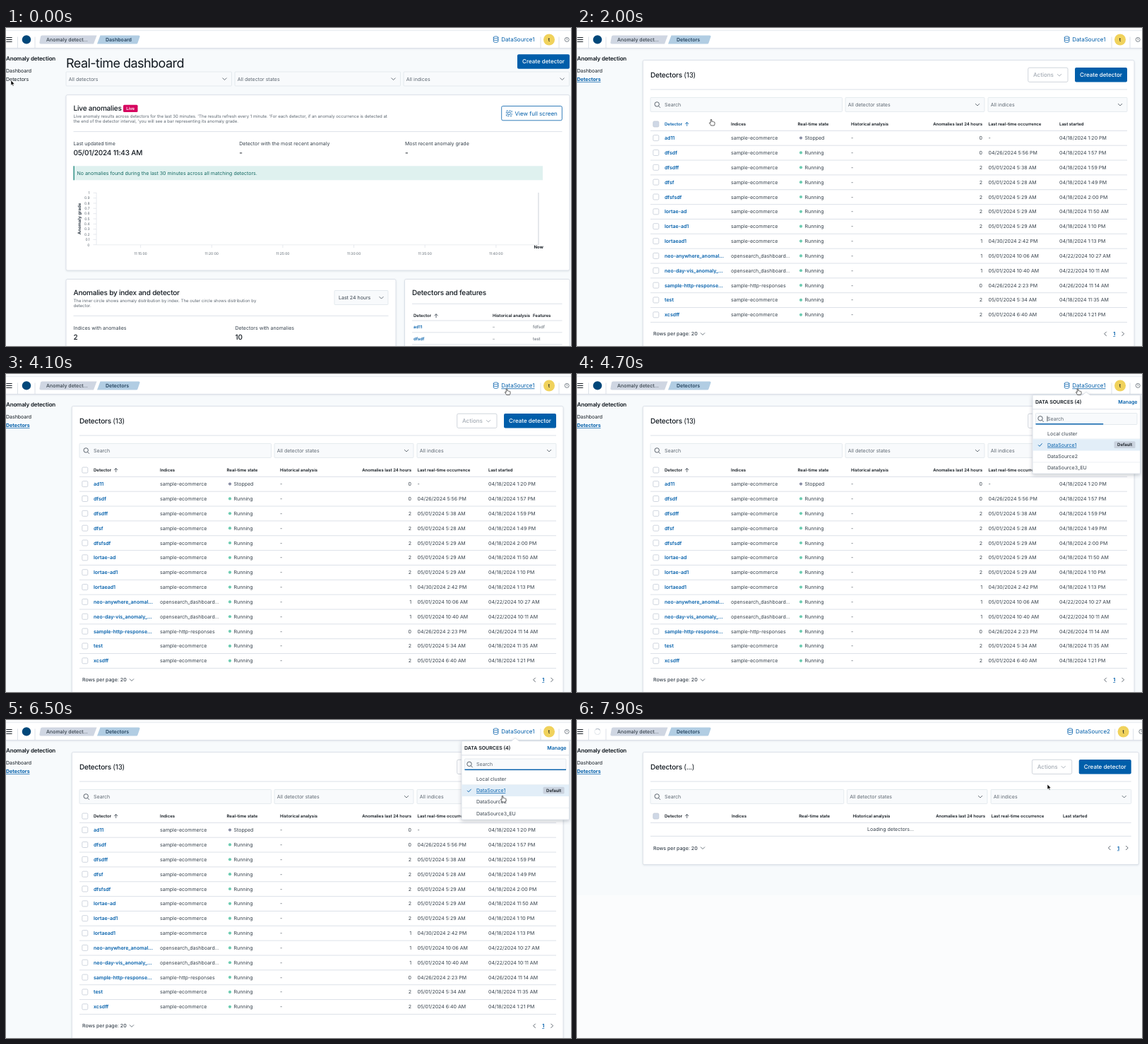
Animation, 800 px wide and 450 px high, one loop 8000 ms. Source, as an HTML page:

```html
<!DOCTYPE html>
<html lang="en">
<head>
<meta charset="utf-8">
<title>Detectors</title>
<style>
  html, body { margin: 0; width: 100%; height: 100%; overflow: hidden; background: #fbfcfd; }
  svg { display: block; width: 800px; height: 450px; }
  text { font-family: Inter, "Noto Sans", sans-serif; text-rendering: geometricPrecision; white-space: pre; }
</style>
</head>
<body>
<svg id="stage" viewBox="0 0 800 450"></svg>
<script>
const LOOP = 8000, STEP = 100;
const INK = '#11181f', BODY = '#36414c', MUTED = '#5c6670', BLUE = '#005eaa', LINE = '#d3dae3';

// y is the middle of the capitals
const text = (x, y, s, { size = 7, w = 400, fill = BODY, ls = 0, at = 'start', extra = '' } = {}) =>
  `<text x="${x}" y="${y + size * 0.36}" font-size="${size}" font-weight="${w}" fill="${fill}" letter-spacing="${ls}em" text-anchor="${at}" ${extra}>${s}</text>`;
const title = (x, y, s) => text(x, y, s, { size: 10, w: 500, fill: INK, ls: -0.02 });
const small = (x, y, s) => text(x, y, s, { size: 6, fill: MUTED });
const head = (x, y, s, at) => text(x, y, s, { size: 6, w: 600, fill: INK, at });
const rect = (x, y, w, h, fill, extra = '') =>
  `<rect x="${x}" y="${y}" width="${w}" height="${h}" fill="${fill}" ${extra}/>`;
const path = (d, stroke, w = 0.8, extra = '') =>
  `<path d="${d}" fill="none" stroke="${stroke}" stroke-width="${w}" ${extra}/>`;
const hline = (x1, x2, y, c = LINE) => path(`M${x1} ${y}H${x2}`, c);
const vline = (x, y1, y2, c = LINE) => path(`M${x} ${y1}V${y2}`, c);
const group = (id, body, extra = '') => `<g id="${id}" ${extra}>${body}</g>`;
const down = (x, y, c = MUTED) => path(`M${x - 3} ${y - 1.4}l3 3l3 -3`, c, 0.9);
const up = (x, y, c) => path(`M${x} ${y + 2.8}V${y - 2.6}M${x - 2.5} ${y}l2.5 -2.6l2.5 2.6`, c);
const lens = (x, y) => path(`M${x + 2} ${y + 2}l2.2 2.4M${x + 2.7} ${y - 0.5}a3.2 3.2 0 1 0 -6.4 0a3.2 3.2 0 1 0 6.4 0`, BODY);
const panel = (x, y, w, h) => rect(x, y, w, h, '#fff', `rx="2" stroke="${LINE}" stroke-width=".8" filter="url(#soft)"`);
const field = (x, y, w, h = 20) => rect(x, y, w, h, '#f8fafc', 'rx="1" stroke="#dce2e9" stroke-width=".7"');
const select = (x, y, w, s) => field(x, y, w) + text(x + 3.8, y + 10, s, { fill: MUTED }) + down(x + w - 10, y + 10);
const primary = (x, y) => rect(x, y, 74, 20.5, BLUE, 'rx="2"') +
  text(x + 37, y + 10.4, 'Create detector', { size: 8, w: 500, fill: '#fff', at: 'middle' });
const box = (x, y, fill = '#fff') => rect(x - 4, y - 4, 8, 8, fill, 'rx="1.5" stroke="#c3cbd6" stroke-width=".8"');

function dashboard() {
  let s = text(0, 72.7, 'Detectors', { fill: INK, extra: 'id="navLink"' }) +
    text(85, 49.5, 'Real-time dashboard', { size: 18, fill: INK, ls: -0.03 }) + primary(724, 37.2) +
    select(85, 62, 234.5, 'All detectors') + select(324, 62, 234.5, 'All detector states') + select(563, 62, 234.5, 'All indices');

  s += panel(85, 94.7, 713, 248.3) + title(95.5, 113.3, 'Live anomalies') +
    rect(166, 108.8, 20.5, 10.2, '#d6065f', 'rx="1.5"') +
    text(176.2, 113.9, 'Live', { size: 6, w: 600, fill: '#fff', at: 'middle' }) +
    small(95.5, 125, "Live anomaly results across detectors for the last 30 minutes. 'The results refresh every 1 minute. 'For each detector, if an anomaly occurrence is detected at") +
    small(95.5, 132, "the end of the detector interval, 'you will see a bar representing its anomaly grade.") +
    rect(701.7, 110.5, 85.6, 20.3, '#fff', `rx="2" stroke="${BLUE}" stroke-width=".8"`) +
    rect(708.5, 117, 7.6, 7.6, 'none', `stroke="${BLUE}" stroke-width=".8" stroke-dasharray="2.4 1.4"`) +
    rect(710.6, 119.1, 3.4, 3.4, 'none', `stroke="${BLUE}" stroke-width=".7"`) +
    text(720.5, 120.7, 'View full screen', { size: 8, fill: BLUE }) + hline(95.5, 787.5, 146.6);
  [[95.5, 'Last updated time', '05/01/2024 11:43 AM'], [330.3, 'Detector with the most recent anomaly', '-'], [565, 'Most recent anomaly grade', '-']]
    .forEach(([x, label, value]) => s += text(x, 163.3, label) + title(x, 176.8, value));
  s += rect(95.5, 195.3, 664.5, 20, '#dff1ef') + rect(95.5, 195.3, 1.3, 20, '#1f857c') +
    text(100.5, 205.3, 'No anomalies found during the last 30 minutes across all matching detectors.', { fill: '#166b64' });

  for (let i = 0; i <= 10; i++) {
    const y = 233.3 + i * 7.34;
    s += text(118.5, y, i % 10 ? `0.${10 - i}` : 1 - i / 10, { size: 5, fill: MUTED, at: 'end' }) + hline(123.5, 128, y, '#e0e4ea');
  }
  s += vline(128, 233, 307, '#e0e4ea') + hline(128, 754, 306.8, '#e6e9ee');
  for (let i = 0; i < 6; i++) {
    const x = 190.6 + i * 100.65;
    s += vline(x, 307, 311, '#e0e4ea') + text(x, 319.6, `11:${15 + 5 * i}:00`, { size: 5, fill: MUTED, at: 'middle' });
  }
  s += text(0, 0, 'Anomaly grade', { size: 6, w: 700, fill: BODY, at: 'middle', extra: 'transform="translate(103.6 270)rotate(-90)"' }) +
    rect(753.2, 233, 1.5, 74, '#dde0e5') + text(754.2, 309.6, 'Now', { size: 6, w: 700, fill: INK, at: 'middle' });

  s += panel(85, 355.5, 467, 120) + title(95.5, 374, 'Anomalies by index and detector') +
    small(95.5, 386, 'The inner circle shows anomaly distribution by index. The outer circle shows distribution by') +
    small(95.5, 393, 'detector.') + field(465, 371.5, 76) + text(471, 381.5, 'Last 24 hours') + down(531.5, 381.5) +
    hline(95.5, 541.5, 407.3) + text(95.5, 424.2, 'Indices with anomalies') + title(95.5, 437.7, '2') +
    text(324.5, 424.2, 'Detectors with anomalies') + title(324.5, 437.7, '10');

  s += panel(564.5, 355.5, 233.5, 120) + title(575, 374, 'Detectors and features') + hline(575, 787.5, 390.3) +
    head(577, 407.3, 'Detector') + up(609, 407.3, BODY) + head(689, 407.3, 'Historical analysis') + head(746, 407.3, 'Features') + hline(575, 787.5, 414);
  [['ad11', 'fdfsdf'], ['dfsdf', 'test']].forEach(([name, feature], i) => {
    const y = 422.5 + i * 17;
    s += text(577, y, name, { size: 6, w: 600, fill: BLUE }) + small(689, y, '–') + small(746, y, feature) + hline(575, 787.5, y + 8.3);
  });
  return s;
}

const E = 'sample-ecommerce', O = 'opensearch_dashboard...';
const ROWS = [
  ['ad11', E, 0, '-', '04/18/2024 1:20 PM'],
  ['dfsdf', E, 0, '04/26/2024 5:56 PM', '04/18/2024 1:57 PM'],
  ['dfsdff', E, 2, '05/01/2024 5:38 AM', '04/18/2024 1:59 PM'],
  ['dfsf', E, 2, '05/01/2024 5:28 AM', '04/18/2024 1:49 PM'],
  ['dfsfsdf', E, 2, '05/01/2024 5:29 AM', '04/18/2024 2:00 PM'],
  ['lortae-ad', E, 2, '05/01/2024 5:29 AM', '04/18/2024 11:50 AM'],
  ['lortae-ad1', E, 2, '05/01/2024 5:29 AM', '04/18/2024 1:10 PM'],
  ['lortaead1', E, 1, '04/30/2024 2:42 PM', '04/18/2024 1:13 PM'],
  ['neo-anywhere_anomal...', O, 1, '05/01/2024 10:06 AM', '04/22/2024 10:27 AM'],
  ['neo-day-vis_anomaly_...', O, 1, '05/01/2024 10:40 AM', '04/22/2024 10:11 AM'],
  ['sample-http-response...', 'sample-http-responses', 0, '04/26/2024 2:23 PM', '04/26/2024 11:14 AM'],
  ['test', E, 2, '05/01/2024 5:34 AM', '04/18/2024 11:35 AM'],
  ['xcsdff', E, 2, '05/01/2024 6:40 AM', '04/18/2024 1:21 PM'],
];

// While loading there is no scrollbar, so the page is a little wider.
function detectors(loading) {
  const dx = loading ? 5.7 : 0, right = 779 + dx;
  const X = x => 104 + (x - 104) * (right - 104) / 675;
  let s = text(0, 72.7, 'Detectors', { w: 700, fill: BLUE, extra: 'text-decoration="underline"' }) +
    panel(93.3, 45.6, 695.7 + dx * 1.1, loading ? 159 : 430) +
    title(104, 66.5, `Detectors <tspan font-weight="400">(${loading ? '...' : 13})</tspan>`) +
    rect(638.7 + dx, 56.2, 56.3, 20.2, '#fff', 'rx="2" stroke="#c4cbd3" stroke-width=".8"') +
    text(646 + dx, 66.5, 'Actions', { size: 8, w: 500, fill: '#a5acb5' }) + down(683 + dx, 66.5, '#a5acb5') +
    primary(705 + dx, 56) + hline(104, right, 87) +
    field(104, 98.4, X(375.5) - 104) + lens(113.7, 108.4) + text(124, 108.6, 'Search', { fill: MUTED }) +
    select(X(380), 98.4, X(577) - X(380), 'All detector states') + select(X(582), 98.4, right - X(582), 'All indices');
  const hot = `id="sort${loading ? 0 : 1}"`;
  s += `<g ${hot}>` + box(111.8, 136, loading ? '#cfd8e6' : '#fff') + head(124, 136, 'Detector') + up(155.7, 136, BODY) + '</g>';
  [[218, 'Indices'], [312.5, 'Real-time state'], [388, 'Historical analysis'], [574, 'Anomalies last 24 hours', 'end'],
   [582.5, 'Last real-time occurrence'], [683, 'Last started']].forEach(([x, label, at]) => s += head(X(x), 136, label, at));
  s += hline(104, right, 145.4);

  if (loading) s += text(444, 154.8, 'Loading detectors...', { at: 'middle' }) + hline(104, right, 164.4);
  else ROWS.forEach(([name, index, count, last, start], i) => {
    const y = 155.6 + i * 20.85;
    s += box(111.8, y) + text(124, y, name, { w: 600, fill: BLUE }) + text(218, y, index) +
      `<circle cx="317" cy="${y}" r="2.1" fill="${i ? '#6dccb1' : '#8a8fa6'}"/>` + text(322.5, y, i ? 'Running' : 'Stopped') +
      text(388, y, '-') + text(574, y, count, { at: 'end' }) + text(582.5, y, last) + text(683, y, start) + hline(104, right, y + 10.6);
  });

  const y = loading ? 181 : 432.8;
  return s + text(108, y, 'Rows per page: 20', { w: 500 }) + down(178, y) +
    path(`M${749.7 + dx} ${y - 3}l-3 3l3 3M${771.5 + dx} ${y - 3}l3 3l-3 3`, BODY) +
    text(760.7 + dx, y, '1', { w: 700, fill: BLUE, at: 'middle', extra: 'text-decoration="underline"' });
}

function header() {
  const right = path('M690.3 13.3v5.6c0 2 6.6 2 6.6 0v-5.6c0 -1.9 -6.6 -1.9 -6.6 0c0 1.9 6.6 1.9 6.6 0M690.3 16.1c0 1.9 6.6 1.9 6.6 0', BLUE) +
    text(701.3, 16.5, 'DataSource1', { size: 8, fill: BLUE, extra: 'id="source"' }) +
    vline(757, 12.5, 28.5) + '<circle cx="769" cy="16.5" r="8" fill="#f0d25c"/>' + text(769, 16.3, 't', { w: 500, fill: INK, at: 'middle' }) +
    vline(783, 12.5, 28.5) + '<circle cx="794.2" cy="16.4" r="3" fill="none" stroke="#5c6670" stroke-width=".8"/>' +
    text(794.2, 16.4, '?', { size: 4.5, at: 'middle' });
  return rect(0, 0, 800, 3.6, '#fbfcfd') + rect(0, 3.6, 800, 25, '#fff', 'filter="url(#soft)"') + hline(0, 800, 3.6, '#e3e7ec') + hline(0, 800, 28.6) +
    path('M.4 13.6H8.6M.4 16.5H8.6M.4 19.4H8.6', INK, 1) + vline(16.5, 12.5, 28.5) + vline(41, 12.5, 28.5) +
    '<circle id="logo" cx="29" cy="16.4" r="6.2" fill="#00477a"/>' +
    group('spin', '<circle r="4" fill="none" stroke="#e2e6eb"/>' + path('M0 -4A4 4 0 0 1 4 0', '#aab4c0', 1)) +
    '<path d="M49.5 10.4H128.5L124 22.5H49.5Q47 22.5 47.5 20L49 12Q49.4 10.4 51 10.4Z" fill="#cfd6e2"/>' +
    '<path d="M133.5 10.4H187.5Q190 10.4 189.4 12.5L186.5 21Q186 22.5 184.5 22.5H129Z" fill="#b1cde3"/>' +
    text(57, 16.5, 'Anomaly detect...', { w: 500 }) + text(141, 16.5, 'Dashboard', { w: 600, fill: '#24435e', extra: 'id="crumb"' }) +
    group('headRight', right) + text(0, 43.3, 'Anomaly detection', { size: 8, w: 600, fill: INK, ls: -0.02 }) + text(0, 60, 'Dashboard', { fill: INK });
}

function menu() {
  const item = (y, s, extra = '', fill = BODY) => text(666, y, s, { fill, extra });
  return `<path d="M645 29.8H715.5L721 25.5L726.5 29.8H797.5V141H645Z" fill="#fff" stroke="${LINE}" stroke-width=".8" filter="url(#deep)"/>` +
    text(649, 39.8, 'DATA SOURCES (4)', { w: 600, fill: INK }) + text(793.5, 39.8, 'Manage', { w: 600, fill: BLUE, at: 'end' }) + hline(645, 797.5, 49.8) +
    group('items', field(649.5, 55, 143.5, 16) + lens(656.5, 62.8) + text(666, 62.9, 'Search', { fill: MUTED }) +
      rect(649.5, 69.6, 143.5, 1.4, BLUE, 'id="focus"') + rect(665.6, 59, 0.7, 7.6, INK, 'id="caret"') +
      item(83.5, 'Local cluster') + hline(645.4, 797, 91.4, '#e8ecf1') +
      rect(645.4, 91.8, 151.7, 16.2, '#e2eef8') + path('M653 99.8l2 2l3.6 -4', BLUE, 0.9) +
      item(99.8, 'DataSource1', 'text-decoration="underline"', BLUE) + rect(760.5, 94.8, 30, 9.8, '#c9d2de', 'rx="1.5"') +
      text(775.6, 99.7, 'Default', { size: 6, w: 600, fill: INK, at: 'middle' }) +
      item(115.9, 'DataSource2', 'id="second"') + hline(645.4, 797, 124.4, '#e8ecf1') + item(132.2, 'DataSource3_EU'));
}

const POINTERS =
  group('arrow', '<path d="M0 0V7.2L1.7 5.7L2.8 8.2L4 7.7L2.9 5.2H5.2Z" fill="#000" stroke="#fff" stroke-width=".6"/>') +
  group('hand', '<path d="M-.8 4.5V.7Q0 -.5 .8 .7V3.4Q1.8 2.8 2.3 3.7Q3.4 3.1 3.8 4.1Q5 3.7 5 5V6.6Q5 7.7 4.2 9H-.3Q-.8 7.8 -2.6 5.5Q-2.6 4.2 -.8 5.4Z" fill="#fff" stroke="#222" stroke-width=".7"/>') +
  group('beam', path('M-1.7 -4Q0 -4 0 -3Q0 -4 1.7 -4M0 -3V3M-1.7 4Q0 4 0 3Q0 4 1.7 4M-1 .9H1', '#222', 0.8));

const svg = document.getElementById('stage');
svg.innerHTML = `<defs>
  <filter id="soft" x="-5%" y="-20%" width="110%" height="150%"><feDropShadow dx="0" dy="1" stdDeviation="1" flood-color="#5a6b80" flood-opacity=".16"/></filter>
  <filter id="deep" x="-10%" y="-10%" width="120%" height="125%"><feDropShadow dx="0" dy="2" stdDeviation="2.5" flood-color="#34445a" flood-opacity=".28"/></filter></defs>` +
  rect(0, 0, 800, 450, '#fbfcfd') + rect(0, 28, 800, 422, '#f7fafc', 'id="backdrop"') + header() +
  group('dash', dashboard()) + group('load', detectors(true)) + group('list', detectors(false)) +
  group('menu', menu()) + group('pointer', POINTERS);

const $ = id => document.getElementById(id);
const show = (id, on) => $(id).setAttribute('display', on ? 'inline' : 'none');
const underline = (id, on) => $(id).setAttribute('text-decoration', on ? 'underline' : 'none');
const clamp = v => Math.max(0, Math.min(1, v));

// time, x, y of the pointer's hot spot
const TRACK = [[0, 7, 74], [900, 7, 74], [1200, 16.5, 72.8], [1600, 16.5, 72.8], [2000, 190, 129], [2200, 205, 129],
  [3100, 660, 100], [3600, 692, 46], [3900, 709, 20.5], [5200, 709, 20.5], [6500, 703, 107], [6800, 703, 113], [7100, 703, 113], [7600, 666, 91], [8000, 666, 91]];
const SHAPES = [[0, 'arrow'], [1100, 'hand'], [1700, 'arrow'], [2000, 'hand'], [2200, 'arrow'], [3000, 'beam'],
  [3200, 'arrow'], [3800, 'hand'], [5400, 'arrow'], [6200, 'hand'], [7200, 'arrow']];

function pointerAt(t) {
  const i = TRACK.findIndex(k => k[0] > t), [t0, x0, y0] = TRACK[i - 1], [t1, x1, y1] = TRACK[i];
  const p = (t - t0) / (t1 - t0), e = p * p * (3 - 2 * p);
  return [x0 + (x1 - x0) * e, y0 + (y1 - y0) * e];
}

function render(t) {
  const loading = (t >= 1700 && t < 1900) || t >= 7200;
  const view = loading ? 'load' : t < 1700 ? 'dash' : 'list';
  ['dash', 'load', 'list'].forEach(id => show(id, id === view));
  underline('navLink', t >= 1100);
  $('backdrop').setAttribute('height', loading ? 220 : 422);

  $('crumb').textContent = t < 1700 ? 'Dashboard' : 'Detectors';
  $('source').textContent = t < 7100 ? 'DataSource1' : 'DataSource2';
  underline('source', t >= 3800 && t < 5400);
  $('headRight').setAttribute('transform', `translate(${loading ? 4.6 : 0} 0)`);
  show('logo', !loading);
  show('spin', loading);
  $('spin').setAttribute('transform', `translate(29 16.5)rotate(${t * 0.36})`);

  const hover = t >= 2000 && t < 2200;
  const [check, label, arrow] = $('sort1').children;
  check.setAttribute('fill', hover ? '#cfd8e6' : '#fff');
  label.setAttribute('fill', hover ? BLUE : INK);
  arrow.setAttribute('stroke', hover ? BLUE : BODY);

  show('menu', t >= 4400 && t < 7100);
  $('menu').setAttribute('opacity', clamp((t - 4300) / 300));
  $('items').setAttribute('transform', `translate(0 ${t < 4800 ? 0.5 : 0})`);
  $('focus').setAttribute('width', 143.5 * clamp((t - 4500) / 300));
  show('caret', t >= 4600 && (t - 4600) % 1000 < 500);
  underline('second', t >= 6700);

  const shape = SHAPES.filter(k => k[0] <= t).pop()[1];
  ['arrow', 'hand', 'beam'].forEach(id => show(id, id === shape));
  $('pointer').setAttribute('transform', `translate(${pointerAt(t)})`);
}

function tick() {
  render(Math.floor(performance.now() % LOOP / STEP) * STEP);
  requestAnimationFrame(tick);
}
tick();
</script>
</body>
</html>
```
